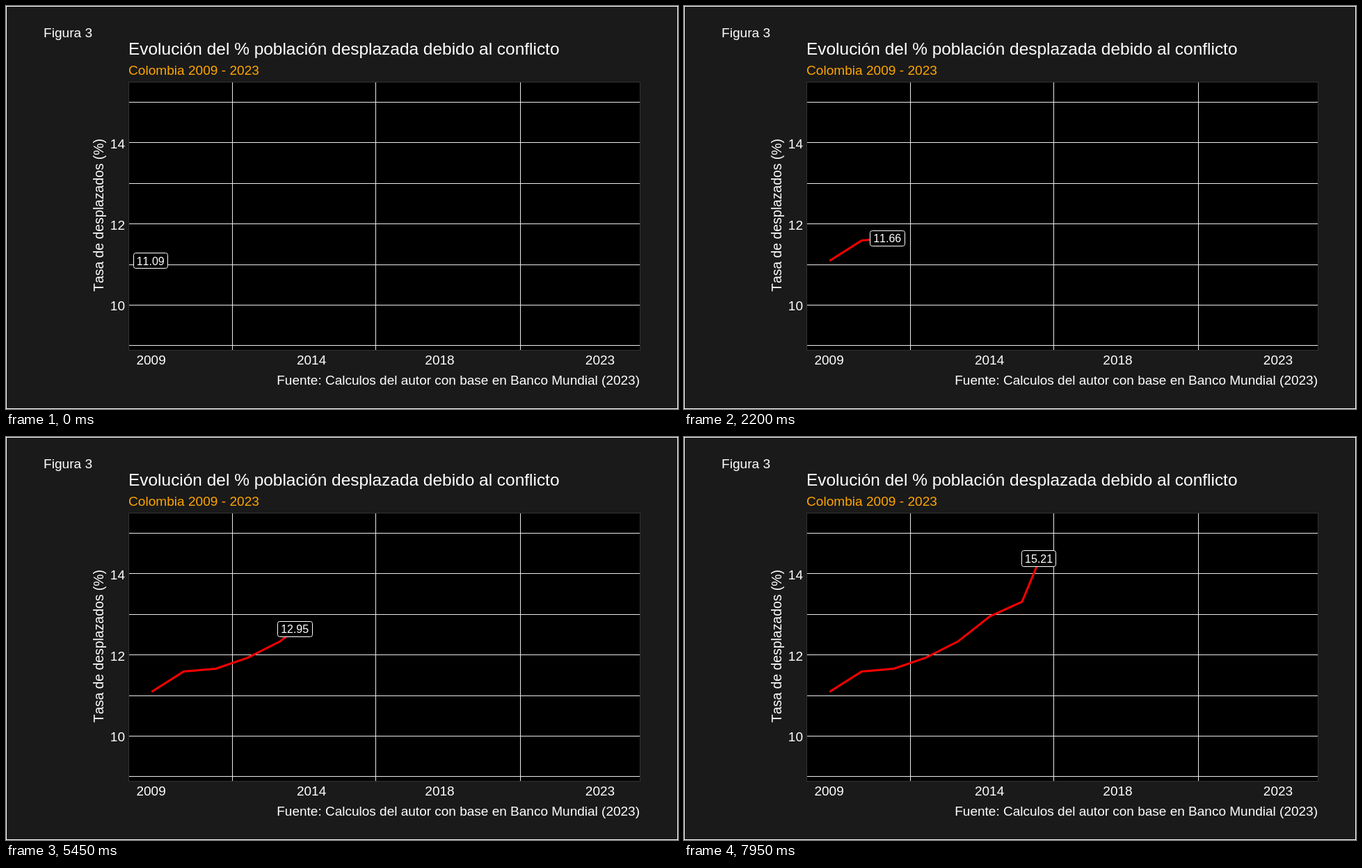
Recreate the animation shown at these times as an HTML page with a canvas. Size 966 px wide and 580 px high, loop 8 s.

```html
<!DOCTYPE html>
<html lang="es">
<head>
<meta charset="utf-8">
<title>Figura 3</title>
<style>
html, body { margin: 0; width: 100%; height: 100%; overflow: hidden; background: #1a1a1a; }
canvas { display: block; }
</style>
</head>
<body>
<canvas id="stage" width="966" height="580"></canvas>
<script>
const ctx = document.getElementById('stage').getContext('2d');
const FONT = '"Liberation Sans", Arial, sans-serif';
const STEP = 50, LOOP = 8000;

// Yearly rates, starting in 2009
const rates = [11.09, 11.59, 11.66, 11.93, 12.33, 12.95, 13.31, 15.21];
const FRAMES_PER_YEAR = 339 / 14;
const keyAt = year => Math.round(year * FRAMES_PER_YEAR);

const px = year => 209.3 + 46.1 * year;
const py = rate => 313.6 + (12 - rate) * 58.4;

function text(str, x, y, size = 19, align = 'left', color = '#fff') {
  ctx.font = `${size}px ${FONT}`;
  ctx.textAlign = align;
  ctx.fillStyle = color;
  ctx.fillText(str, x, y);
}

function drawChart() {
  ctx.fillStyle = '#1a1a1a';
  ctx.fillRect(0, 0, 966, 580);
  ctx.lineWidth = 1;
  ctx.strokeStyle = '#fff';
  ctx.strokeRect(0.5, 0.5, 965, 579);

  ctx.fillStyle = '#000';
  ctx.fillRect(176, 109, 736, 387);
  ctx.fillStyle = '#ebebeb';
  for (let rate = 9; rate <= 15; rate++) ctx.fillRect(176, Math.floor(py(rate)), 736, 1);
  for (const x of [325, 531, 739]) ctx.fillRect(x, 109, 1, 387);
  ctx.strokeStyle = '#333';
  ctx.strokeRect(176.5, 109.5, 735, 386);

  text('Figura 3', 54, 45, 19.1);
  text('Evolución del % población desplazada debido al conflicto', 176, 70, 24.45);
  text('Colombia 2009 - 2023', 176, 99, 19.1, 'left', '#ffa500');
  text('Fuente: Calculos del autor con base en Banco Mundial (2023)', 911, 545, 19, 'right');
  for (const rate of [10, 12, 14]) text(rate, 171, Math.round(py(rate)) + 8, 19, 'right');
  for (const year of [0, 5, 9, 14]) text(2009 + year, px(year) - 0.7, 516, 19, 'center');

  ctx.save();
  ctx.translate(140, 301);
  ctx.rotate(-Math.PI / 2);
  text('Tasa de desplazados (%)', 0, 0, 19.4, 'center');
  ctx.restore();
}

function drawLine(year, x, y) {
  ctx.beginPath();
  for (let i = 0; i <= year; i++) ctx.lineTo(px(i), py(rates[i]));
  ctx.lineTo(x, y);
  ctx.strokeStyle = '#f00';
  ctx.lineWidth = 3;
  ctx.stroke();
}

function drawLabel(str, x, y) {
  const left = Math.round(x - 25.05), right = Math.round(x + 25.05);
  const top = Math.round(y - 11.6), bottom = Math.round(y + 11.6);
  ctx.beginPath();
  ctx.roundRect(left + 0.5, top + 0.5, right - left - 1, bottom - top - 1, 3);
  ctx.fillStyle = '#000';
  ctx.fill();
  ctx.strokeStyle = '#fff';
  ctx.lineWidth = 1;
  ctx.stroke();
  text(str, x - 0.3, Math.round(y + 6), 16, 'center');
}

function render(time) {
  const frame = Math.floor((time % LOOP) / STEP);
  let year = 0;
  while (keyAt(year + 1) <= frame) year++;
  const part = (frame - keyAt(year)) / (keyAt(year + 1) - keyAt(year));
  const x = px(year + part);
  const y = py(rates[year] + (rates[year + 1] - rates[year]) * part);

  drawChart();
  if (frame > 0) drawLine(year, x, y);
  // The label switches to the next year halfway
  drawLabel(rates[part < 0.5 ? year : year + 1].toFixed(2), x - 1.3, y);
}

ctx.fontKerning = 'none';
const start = performance.now();
function tick() {
  render(performance.now() - start);
  requestAnimationFrame(tick);
}
tick();
</script>
</body>
</html>
```
